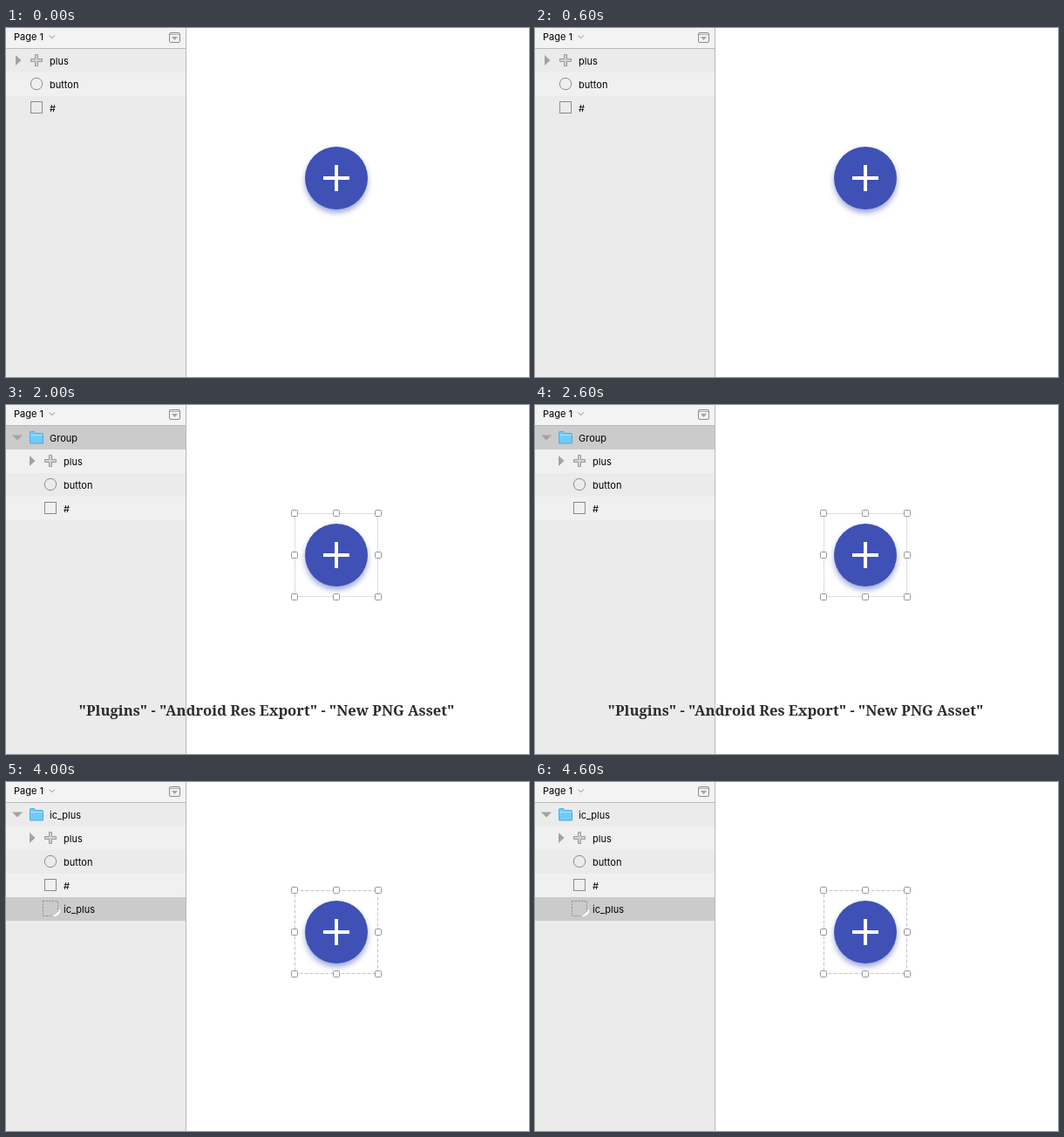
An HTML page for the animation above (5 s loop, 600x400 px).

```html
<!DOCTYPE html>
<html lang="en">
<head>
<meta charset="utf-8">
<title>Naming a layer group</title>
<style>
  html, body { margin: 0; width: 100%; height: 100%; overflow: hidden; background: #fff; }
  svg { display: block; }
  text { font: 11px Inter, Roboto, sans-serif; fill: #000; }
  .caption { font: 600 16.6px "Noto Serif", serif; fill: #2b2b2b; text-anchor: middle; }
  .title { font-size: 12.3px; font-weight: 700; }
  .hint { fill: #808080; }
  .field { font-size: 13px; }
  .label { font-size: 12.7px; text-anchor: middle; fill: #444; }
  .line { fill: none; stroke: #8c8c8c; }
  .arrow { fill: #a3a3a3; }
  .fab { filter: drop-shadow(0 4px 3px rgba(63, 81, 181, .5)); }
  .dialog { filter: drop-shadow(0 13px 18px rgba(0, 0, 0, .36)); }
</style>
</head>
<body>
<svg width="600" height="400" viewBox="0 0 600 400">
  <rect width="206" height="400" fill="#ebebeb"/>
  <rect width="206" height="23" fill="#f3f3f3"/>
  <g id="layers"></g>
  <path d="M0 23.5H206M206.5 0V400" stroke="#b9b9b9"/>
  <text x="9" y="14">Page 1</text>
  <path class="line" d="M49.5 8.5l3.2 3 3.2-3"/>
  <rect class="line" x="187.5" y="5.5" width="12" height="11" rx="1.5" stroke="#999"/>
  <path d="M188 7.5h11" stroke="#aaa"/>
  <path class="arrow" d="M190 10h7l-3.5 4z" fill="#888"/>

  <circle class="fab" cx="379" cy="172" r="36" fill="#3f51b5"/>
  <path d="M364 172h30M379 157v30" stroke="#fff" stroke-width="4"/>
  <g id="selection">
    <rect id="outline" x="331.5" y="124.5" width="95" height="95" fill="none"/>
    <g id="handles" fill="#fff" stroke="#979797"></g>
  </g>

  <text id="caption" class="caption" x="299" y="356">"Plugins" - "Android Res Export" - "New PNG Asset"</text>

  <g id="dialog">
    <rect class="dialog" x="127.5" y="98.5" width="358" height="188" rx="5" fill="#ececec" stroke="#b4b4b4"/>
    <path d="M128 121V103.500q0-4.500 4.500-4.500H480.500q4.500 0 4.500 4.500V121z" fill="#f6f6f6"/>
    <rect x="128" y="121" width="357" height="54" fill="#fff"/>
    <path d="M128 120.500H485" stroke="#d9d9d9"/>
    <path d="M128 175.500H485" stroke="#b7b7b7"/>
    <circle cx="164" cy="149.500" r="15" fill="#fdad00"/>
    <text class="title" x="187" y="146">User Input</text>
    <text class="hint" x="187" y="160">Input asset name for "Group".</text>
    <rect x="145" y="192" width="323" height="28" rx="3" fill="#92c0f1"/>
    <rect x="148.500" y="195.500" width="316" height="21" fill="#fff" stroke="#6fa3dc"/>
    <text class="field" x="152" y="212">ic_plus</text>
    <g id="buttons"></g>
  </g>
</svg>
<script>
const $ = id => document.getElementById(id);
const STEP = 1000, STATES = 5;

// Icons are drawn around their own centre.
const icons = {
  plus: '<path d="M-1.500-6.500h3v5h5v3h-5v5h-3v-5h-5v-3h5z" fill="#d2d2d2" stroke="#999"/>',
  circle: '<circle class="line" r="6.700"/>',
  square: '<rect class="line" x="-6.500" y="-6.500" width="13" height="13"/>',
  folder: '<path d="M-7.500 7V-5.500q0-1 1-1h4l1.500 2h7.500q1 0 1 1V7z" fill="#6fcbfb" stroke="#56a9d6"/>' +
    '<path d="M-7-2.500H7" stroke="#a9e1ff"/>',
  slice: '<rect class="line" x="-8.500" y="-8.500" width="17" height="17" stroke-dasharray="2 1.500"/>' +
    '<path d="M2 9Q8 6 11 0V4Q9 9 5 9z" fill="#fff"/>'
};
const arrows = { closed: 'M-24-6l6.500 6-6.500 6z', open: 'M-28-2.500h12l-6 6z' };

const layer = (name, icon, indent = 0, arrow = '') => ({ name, icon, indent, arrow });
const shapes = indent => [
  layer('plus', 'plus', indent, 'closed'),
  layer('button', 'circle', indent),
  layer('#', 'square', indent)
];
const grouped = name => [layer(name, 'folder', 0, 'open'), ...shapes(16)];

function drawLayers(list, selected) {
  $('layers').innerHTML = list.map((row, i) => {
    const top = 24 + i * 27, x = 35 + row.indent;
    const fill = i === selected ? '#cbcbcb' : i % 2 ? '#f0f0f0' : '#ebebeb';
    return `<rect y="${top}" width="206" height="27" fill="${fill}"/>
      <g transform="translate(${x} ${top + 13})">${icons[row.icon]}
        <path class="arrow" d="${arrows[row.arrow] || ''}"/>
        <text x="15" y="5">${row.name}</text></g>`;
  }).join('');
}

function show(id, visible) {
  $(id).style.display = visible ? '' : 'none';
}

function draw(state) {
  const last = state === 4;
  if (state === 0) drawLayers(shapes(0), -1);
  else if (last) drawLayers([...grouped('ic_plus'), layer('ic_plus', 'slice', 16)], 4);
  else drawLayers(grouped('Group'), 0);
  show('selection', state > 0);
  show('caption', state === 2);
  show('dialog', state === 3);
  $('outline').setAttribute('stroke', last ? '#c4c4c4' : '#dedede');
  $('outline').setAttribute('stroke-dasharray', last ? '4 2' : 'none');
}

for (let i = 0; i < 9; i++) {
  if (i === 4) continue;
  const x = 327.5 + i % 3 * 48, y = 120.5 + Math.floor(i / 3) * 48;
  $('handles').innerHTML += `<rect x="${x}" y="${y}" width="7" height="7" rx="1"/>`;
}
[['Cancel', 297], ['OK', 385]].forEach(([name, x]) => {
  $('buttons').innerHTML += `<rect x="${x + .5}" y="244.500" width="79" height="21" rx="3.500" fill="#fff" stroke="#c6c6c6"/>
    <path d="M${x + 3} 265.500h74" stroke="#aeaeae"/>
    <text class="label" x="${x + 40}" y="260">${name}</text>`;
});

const start = performance.now();
let current = -1;
function tick() {
  const state = Math.floor((performance.now() - start) / STEP) % STATES;
  if (state !== current) draw(current = state);
  requestAnimationFrame(tick);
}
tick();
</script>
</body>
</html>
```
